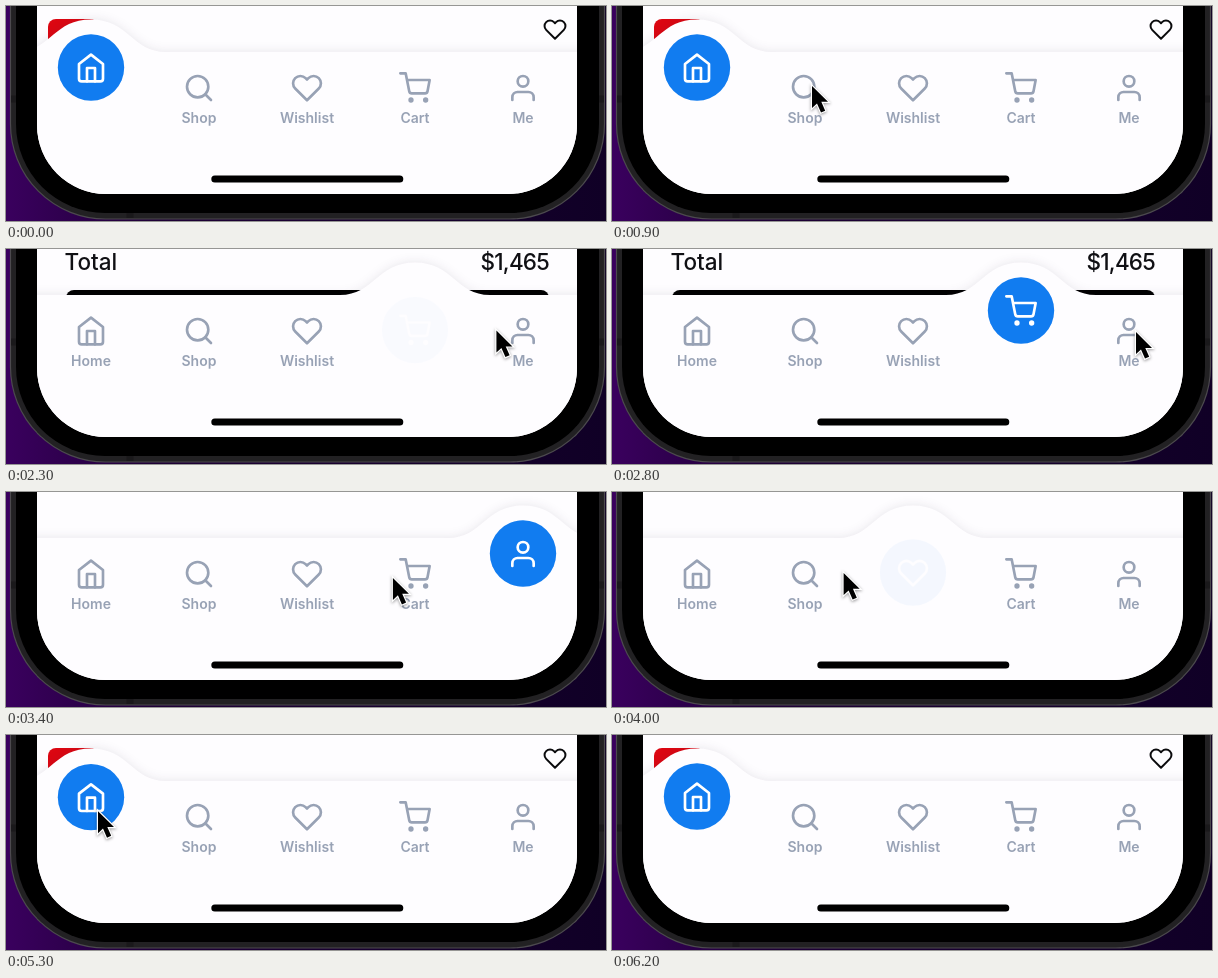
An HTML page that plays this animation: 600x215 px, repeating every 7.1 s.

```html
<!DOCTYPE html>
<html lang="en">
<head>
<meta charset="utf-8">
<title>Curved tab bar</title>
<style>
  html, body { margin: 0; width: 100%; height: 100%; overflow: hidden; background: #12002a; }
  svg { display: block; width: 600px; height: 215px; }
  text { font-family: Inter, "Open Sans", sans-serif; font-weight: 500; }
  .icon { fill: none; stroke: currentColor; stroke-width: 2; stroke-linecap: round; stroke-linejoin: round; }
  .tab { color: #98a2b5; }
  .tab text { font-size: 14px; font-weight: 600; fill: currentColor; text-anchor: middle; }
  #bar { fill: #fefdff; filter: drop-shadow(0 -1px 5px rgba(30, 20, 50, .09)); }
  #button { color: #fff; }
  #cursor { stroke: #fff; stroke-width: 2.4; paint-order: stroke; filter: drop-shadow(0 1px 1.5px rgba(0, 0, 0, .4)); }
  .big { font-size: 22.5px; fill: #101014; }
</style>
</head>
<body>
<svg viewBox="0 0 600 215">
  <defs>
    <linearGradient id="backdrop">
      <stop offset="0" stop-color="#3a005e"/>
      <stop offset=".25" stop-color="#1e0036"/>
      <stop offset="1" stop-color="#100026"/>
    </linearGradient>
    <clipPath id="screen"><rect x="31" y="-120" width="540" height="308" rx="69"/></clipPath>
    <g id="home">
      <path d="M3 9l9-7 9 7v11a2 2 0 0 1-2 2H5a2 2 0 0 1-2-2z"/>
      <path d="M9 22V12h6v10"/>
    </g>
    <g id="shop"><circle cx="11" cy="11" r="8"/><path d="M21 21l-4.35-4.35"/></g>
    <path id="wishlist" d="M20.84 4.61a5.5 5.5 0 0 0-7.78 0L12 5.67l-1.06-1.06a5.5 5.5 0 0 0-7.78 7.78L12 21.23l8.84-8.84a5.5 5.5 0 0 0 0-7.78z"/>
    <g id="cart">
      <circle cx="9" cy="21" r="1"/><circle cx="20" cy="21" r="1"/>
      <path d="M1 1h4l2.68 13.39a2 2 0 0 0 2 1.61h9.72a2 2 0 0 0 2-1.61L23 6H6"/>
    </g>
    <g id="me"><path d="M20 21v-2a4 4 0 0 0-4-4H8a4 4 0 0 0-4 4v2"/><circle cx="12" cy="7" r="4"/></g>
  </defs>

  <rect width="600" height="215" fill="url(#backdrop)"/>
  <rect x="4.5" y="-180" width="594" height="393" rx="95" fill="#222123" stroke="#4c4a4e" stroke-width="1.2"/>
  <path d="M5 93h6M592 93h6M124 207v5" stroke="#1a191b" stroke-width="7"/>
  <rect x="10" y="-180" width="583" height="387" rx="89"/>

  <g clip-path="url(#screen)">
    <rect x="31" width="540" height="190" fill="#fefdff"/>
    <g class="page" data-tab="0">
      <rect x="42" y="13" width="50" height="40" rx="8" fill="#dc0712"/>
      <use href="#wishlist" class="icon" color="#0b0b0d" transform="translate(537 11.5)"/>
    </g>
    <g class="page" data-tab="1">
      <rect x="59" width="358" height="60" fill="#f2f0f3"/>
      <text x="81" y="7" font-size="17" fill="#9ba4b4">0 item</text>
      <path d="M459 0h44v7l-3 1h-38l-3-2z" fill="#cbcbce"/>
      <path d="M459 6l3 1.5h38l3-1" fill="none" stroke="#b4b4b8"/>
    </g>
    <g class="page" data-tab="3">
      <text class="big" x="58.5" y="21">Total</text>
      <text class="big" x="543" y="21" text-anchor="end" letter-spacing="-.8">$1,465</text>
      <rect x="60" y="41" width="483" height="40" rx="8"/>
    </g>
    <path id="bar"/>
    <g id="tabs"></g>
    <g id="button">
      <circle cy="61.5" r="33.2" fill="#117cf0"/>
      <use class="icon" transform="translate(-16 46) scale(1.333)"/>
    </g>
    <rect x="205.3" y="169.6" width="192" height="7" rx="3.5"/>
  </g>
  <path id="cursor" d="M0 0V22L5 17.4 9 26.5 13.2 24.6 9.3 15.8H16Z"/>
</svg>
<script>
  const LOOP = 7100, STEP = 100;
  const FIRST = 600, PACE = 566, RISE = 300;  // one tab per PACE, out and back
  const LEAD = .077, TRAVEL = .318;           // cursor timing, in shares of PACE
  const ENTER = 500, LEAVE = 5600;            // when the cursor is on stage

  const names = ["Home", "Shop", "Wishlist", "Cart", "Me"];
  const last = names.length - 1;
  const $ = id => document.getElementById(id);
  const tabX = i => 85 + 108 * i;
  const tabAt = visit => last - Math.abs(last - visit);
  const clamp = (v, lo = 0, hi = 1) => Math.min(hi, Math.max(lo, v));
  const easeOut = p => 1 - (1 - clamp(p)) ** 4;
  const show = (el, on) => el.style.display = on ? "" : "none";
  const place = (el, x, y) => el.setAttribute("transform", `translate(${x} ${y})`);

  $("tabs").innerHTML = names.map((name, i) => `
    <g class="tab">
      <use href="#${name.toLowerCase()}" class="icon" transform="translate(${tabX(i) - 16} 66) scale(1.333)"/>
      <text x="${tabX(i)}" y="116.5">${name}</text>
    </g>`).join("");

  const tabs = document.querySelectorAll(".tab");
  const pages = document.querySelectorAll(".page");
  const buttonIcon = document.querySelector("#button use");

  function barPath(x) {
    return `M-80 46H${x - 75}C${x - 41} 46 ${x - 38} 13.5 ${x} 13.5
      S${x + 41} 46 ${x + 75} 46H700V200H-80Z`;
  }

  function drawCursor(t, visits) {
    const ahead = visits + LEAD, from = Math.floor(ahead);
    const spot = clamp(from + easeOut((ahead - from) / TRAVEL), 1, 2 * last);
    const below = 140 * (1 - easeOut((t - ENTER) / 600));
    show($("cursor"), t >= ENTER && t < LEAVE);
    place($("cursor"), tabX(tabAt(spot)) + 7, 81 - 5 * Math.cos(spot - 2) + below);
  }

  function draw(t) {
    const visits = (t - FIRST) / PACE;
    const visit = clamp(Math.floor(visits), 0, 2 * last);
    const active = tabAt(visit);
    const p = visit ? clamp((visits - visit) * PACE / RISE) : 1;

    tabs.forEach((el, i) => show(el, i !== active));
    pages.forEach(el => show(el, +el.dataset.tab === active));
    $("bar").setAttribute("d", barPath(tabX(active)));
    buttonIcon.setAttribute("href", "#" + names[active].toLowerCase());
    place($("button"), tabX(active), 20 * (1 - easeOut(p)));
    $("button").setAttribute("opacity", clamp(p * 2.5));
    drawCursor(t, visits);
  }

  const start = performance.now();
  function tick() {
    const t = (performance.now() - start) % LOOP;
    draw(Math.floor(t / STEP) * STEP); // ten pictures a second
    requestAnimationFrame(tick);
  }
  tick();
</script>
</body>
</html>
```
